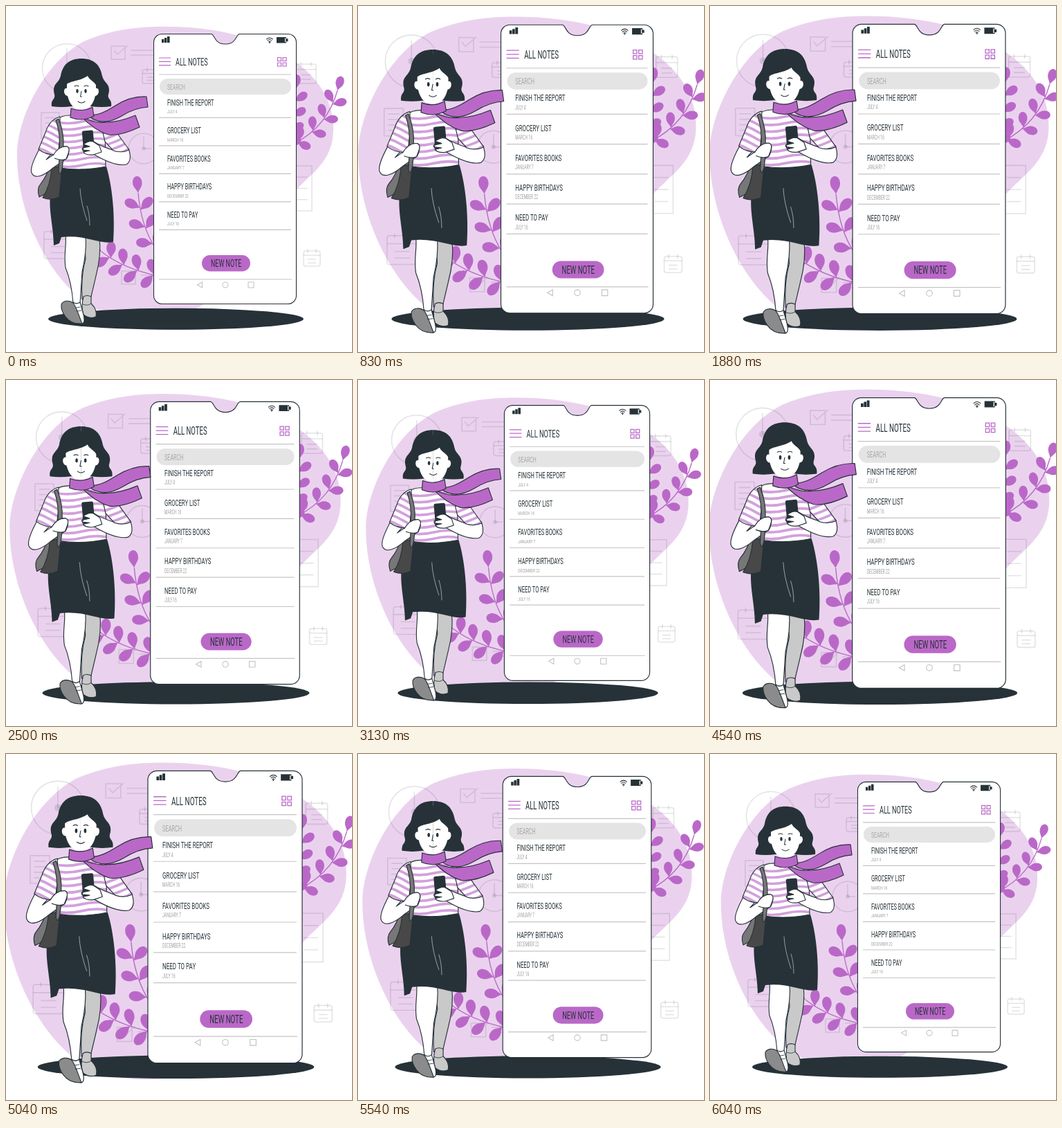
An HTML page for the animation above (6.08 s loop, 500 by 500 pixels).

```html
<!DOCTYPE html>
<html lang="en">
<head>
<meta charset="utf-8">
<title>All notes</title>
<style>
html, body { margin: 0; width: 100%; height: 100%; overflow: hidden; background: #fff }
svg { display: block; width: 100vw; height: 100vh }
text { font-family: Roboto, "Liberation Sans", sans-serif; fill: #263238 }
.dark { fill: #263238 }
.purple { fill: #ba68c8 }
.white { fill: #fff }
.grey { fill: #c9c9c9 }
.line { fill: none; stroke: #263238; stroke-linecap: round; stroke-linejoin: round }
.ink { stroke: #263238; stroke-width: 1.1; stroke-linejoin: round }
.stripes { fill: none; stroke: #d3a0dd; stroke-width: 3.6 }
.rule { stroke: #c4c4c4; stroke-width: 1.1; fill: none }
.accent { stroke: #ba68c8; stroke-width: 1.2; fill: none }
#icons { fill: none; stroke: #263238; stroke-opacity: .13; stroke-width: 1.5 }
#icons .dot { fill: #263238; fill-opacity: .13; stroke: none }
#plants .stem { fill: none; stroke: #ba68c8; stroke-width: 1.3 }
</style>
</head>
<body>
<svg viewBox="0 0 500 500">
  <defs>
    <path id="torso" d="M92 158Q80 158 74 164L78 234Q110 239 144 232L143 176Q138 162 126 158Z"/>
    <path id="sleeveL" d="M78 160Q63 164 57 183L47 207Q58 216 75 215L78 190Z"/>
    <path id="sleeveR" d="M136 166Q152 168 160 183L178 208Q167 213 155 209L143 196Z"/>
    <clipPath id="torsoClip"><use href="#torso"/></clipPath>
    <clipPath id="sleeveLClip"><use href="#sleeveL"/></clipPath>
    <clipPath id="sleeveRClip"><use href="#sleeveR"/></clipPath>
    <path id="halfHair" d="M109 76C92 76 82 84 79 101C77 110 69 112 69 121C69 128 72 129 69 134Q65 138 66 145Q80 147 95 145H109Z"/>
    <path id="halfFace" d="M109 100H96L88 108V119C83 117 82 129 89 130Q94 150 109 150Z"/>
  </defs>

  <path data-pivot="245 240" fill="#ead2ee" d="M215 30C300 28 370 45 420 82C455 108 473 140 473 178C473 235 425 248 400 290C370 340 345 400 290 428C250 457 190 459 140 442C72 414 16 310 16 215C16 162 56 79 115 50Q160 31 215 30Z"/>
  <g id="icons" data-pivot="246 240"></g>
  <ellipse data-pivot="245.5 452.3" class="dark" cx="245.5" cy="452.3" rx="184.5" ry="15.5"/>
  <g id="plants" class="purple" data-pivot="314 247"></g>

  <g id="phone" data-pivot="316.5 235.5">
    <path class="white ink" d="M225.5 40.5H297C302 42 301 55 317 55S332 42 337 40.5H407.5a12 12 0 0 1 12 12V418.5a12 12 0 0 1-12 12H225.5a12 12 0 0 1-12-12V52.5a12 12 0 0 1 12-12Z"/>
    <path class="dark" d="M225 48h3.4v5h-3.4zm4-2h3.4v7h-3.4zm4-2h3.6v9h-3.6zM391 45h14v2.3h2.5v4h-2.5v2.2h-14z"/>
    <path class="white" d="M403 46.3h1.2v6H403z"/>
    <path class="line" d="M376.5 48q4.5-4 9 0M378 50q3-2.8 6 0M379.6 51.8q1.4-1.3 2.8 0"/>
    <circle class="dark" cx="381" cy="53" r=".9"/>
    <rect x="222" y="105" width="190" height="23" rx="11.5" fill="#e4e4e4"/>
    <rect class="purple" x="283" y="360" width="70" height="23.5" rx="11.75"/>
    <path class="accent" d="M221 75h17m-17 5.3h17m-17 5.3h17"/>
    <path class="rule" d="M221 99H412M221 395H413M283.5 399v8l-7-4zM350 399h8v8h-8z"/>
    <circle class="rule" cx="317" cy="403" r="4"/>
  </g>

  <g data-pivot="122 268">
    <!-- legs and shoes -->
    <path class="grey ink" d="M113 334H135Q138 360 130 390L122 424H110Q108 390 115 365Z"/>
    <path class="grey ink" d="M112 420Q117 417 123 420V430Q132 438 130 449Q121 453 112 446Q108 435 112 420Z"/>
    <path class="white ink" d="M86 330H115Q117 355 110 384L107 430H97Q95 400 86 378C83 358 88 346 86 330Z"/>
    <path class="white ink" d="M97 428Q102 432 107 428L112 446Q115 459 109 459Q98 453 97 428Z"/>
    <path fill="#8b8b8b" class="ink" d="M80 431C83 425 92 425 97 429C102 435 105 447 110 459Q94 460 86 449Q79 440 80 431Z"/>
    <path class="line" stroke-width=".8" d="M111 431q7 3 12-1M101 436l6-1M102 441l7-1"/>

    <!-- sweater and skirt -->
    <g data-knit="torso"></g>
    <path class="dark" d="M77 234Q110 239 145 232C153 258 158 300 155 341C135 345 115 330 80 334L77 343L69 346C69 320 60 290 65 268Z"/>
    <path class="line" style="stroke:#aeb4b7" stroke-width=".8" d="M107 264Q108 284 117 310M117 289q4 12 4 28"/>

    <!-- bag and left arm -->
    <path fill="#777" class="ink" d="M66 225L80 222L60 270L48 276Q44 264 50 257Q58 248 66 225Z"/>
    <path fill="#484848" class="ink" d="M66 235Q74 230 81 234L77 276Q66 282 53 277Q64 260 66 235Z"/>
    <path class="white ink" d="M48 207Q34 233 37 241C41 250 53 247 68 234L88 220Q94 207 88 203Q78 202 74 211L58 222L67 212Z"/>
    <g data-knit="sleeveL" data-turn="17 64 190"></g>
    <path fill="#777" class="ink" d="M72 165l4-2q8 20 7 40l-6 4q2-22-5-42Z"/>
    <path fill="#777" class="ink" d="M77 220h6l-2 16q-3 12-5 2Z"/>
    <path class="white ink" d="M68 216Q76 202 88 203Q93 205 90 213L87 221Q80 224 70 220"/>

    <!-- right arm holding a phone -->
    <path class="white ink" d="M177 206Q183 223 174 229C160 232 140 222 128 215Q112 214 110 206Q118 194 127 196Q137 203 160 210Z"/>
    <g data-knit="sleeveR" data-turn="-32 158 190"></g>
    <rect class="dark" x="111" y="180" width="16" height="33" rx="2" transform="rotate(-5 119 196)"/>
    <path class="white ink" d="M112 200Q120 194 126 196L135 202L138 211L126 215Q115 216 112 211L121 209L111 208L112 205L121 203Z"/>

    <!-- scarf tails -->
    <g class="purple ink">
      <path d="M109 160Q128 170 145 168Q163 168 187 158L193 175Q166 188 148 186Q128 180 109 160Z"/>
      <path d="M117 157C132 160 147 151 158 144Q180 130 203 131L205 146Q186 147 167 159C150 169 132 171 117 157Z"/>
    </g>

    <!-- head -->
    <g class="dark" data-mirror="halfHair"></g>
    <g class="white" data-mirror="halfFace"></g>
    <path class="dark" d="M85 117C89 107 105 110 118 101C121 108 128 108 132 118L137 99L110 82L82 99Z"/>
    <path class="line" d="M99 116q3-2 6 0m8 0q3-2 6 0m-10 7l-1.5 8h2M104 138q5 4 10 0"/>
    <g class="dark"><ellipse cx="103" cy="123" rx="1.7" ry="2.9"/><ellipse cx="115" cy="123" rx="1.7" ry="2.9"/></g>
    <path class="purple ink" d="M94 148Q110 154 125 146L127 159Q111 168 93 161Z"/>
  </g>
</svg>

<script>
const $ = q => document.querySelector(q);
const $$ = q => [...document.querySelectorAll(q)];
const add = (g, markup) => g.insertAdjacentHTML('beforeend', markup);
const loop = (n, f) => Array.from({ length: n }, (_, i) => f(i)).join('');

// Background icons
const icon = (d, more = '') => add($('#icons'), `<path d="${d}"/>${more}`);
const box = (x, y, w, h) => `M${x} ${y}h${w}v${h}h${-w}z`;
const clock = (x, y, r) => icon(`M${x} ${y - r * .8}v${r * .8}h${r * .5}`,
  `<circle cx="${x}" cy="${y}" r="${r}"/><circle class="dot" cx="${x}" cy="${y}" r="${r * .13}"/>`);
const check = (x, y) => icon(box(x, y, 20, 19) + `m4 6l5 6l15-13m4 7h33m-33 7h33`);
const page = (x, y, w, h, n) => icon(box(x, y, w, h) +
  loop(n, i => `M${x + w * .2} ${y + h * (i + 1) / (n + 1)}h${w * .6}`));
const calendar = (x, y, w, h) => icon(
  `M${x} ${y + h * .28}h${w}M${x + w / 4} ${y - 3}v6m${w / 2} -6v6` +
  loop(2, i => `M${x + w / 4} ${y + h * (.55 + i * .23)}h${w / 2}`),
  `<rect x="${x}" y="${y}" width="${w}" height="${h}" rx="3"/>`);
clock(88, 90, 35.5);
clock(199, 206, 22);
check(152, 58);
check(167, 383);
page(51, 154, 26, 37, 4);
page(410, 231, 32, 65, 3);
calendar(197, 92, 28, 20);
calendar(419, 84, 29, 28);
calendar(55, 326, 41, 39);
calendar(430, 354, 24, 22);

// A curved stem with pairs of teardrop leaves and one leaf at its end
function branch([x0, y0], [cx, cy], [x1, y1], pairs, len, spread) {
  const at = (a, c, b, t) => a * (1 - t) ** 2 + 2 * c * t * (1 - t) + b * t * t;
  const slope = (a, c, b, t) => (c - a) * (1 - t) + (b - c) * t;
  const leaf = (t, side) => {
    const turn = Math.atan2(slope(y0, cy, y1, t), slope(x0, cx, x1, t)) * 180 / Math.PI + side * spread;
    return `<path transform="translate(${at(x0, cx, x1, t)} ${at(y0, cy, y1, t)}) rotate(${turn}) scale(${len})"
      d="M0 0C.3 -.14 .35 -.29 .65 -.28C.85 -.27 1 -.15 1 0S.85 .27 .65 .28C.35 .29 .3 .14 0 0Z"/>`;
  };
  add($('#plants'), `<path class="stem" d="M${x0} ${y0}Q${cx} ${cy} ${x1} ${y1}"/>` + leaf(1, 0) +
    loop(pairs, i => leaf((i + .3) / pairs, -1) + leaf((i + .2) / pairs, 1)));
}
branch([216, 350], [195, 318], [191, 270], 3, 24, 55);
branch([220, 390], [170, 380], [138, 355], 4, 24, 60);
branch([416, 199], [464, 175], [479, 122], 4, 21, 52);
branch([406, 205], [416, 165], [419, 120], 4, 21, 50);

// Striped knitwear and mirrored halves of the head
for (const g of $$('[data-knit]')) {
  const { knit, turn = '0' } = g.dataset;
  const rows = loop(8, i => `M30 ${167 + i * 9}q20 -5 40 0t40 0t40 0t40 0`);
  add(g, `<use href="#${knit}" class="white"/>
    <g clip-path="url(#${knit}Clip)"><path class="stripes" d="${rows}" transform="rotate(${turn})"/></g>
    <use href="#${knit}" fill="none" class="ink"/>`);
}
for (const g of $$('[data-mirror]')) {
  const half = `<use href="#${g.dataset.mirror}"`;
  add(g, `${half}/>${half} transform="translate(218 0) scale(-1 1)"/>`);
}

// Phone screen; all lettering shares one condensed ratio
const phone = $('#phone');
const label = (x, y, size, str, fill = '#263238') =>
  add(phone, `<text transform="translate(${x} ${y}) scale(.6 1)" font-size="${size}" style="fill:${fill}">${str}</text>`);
add(phone, `<path class="accent" d="${loop(4, i => box(392.5 + i % 2 * 7.5, 74.5 + (i >> 1) * 7.5, 5, 5))}"/>`);
label(245, 86, 15.2, 'ALL NOTES');
label(233, 121, 11.4, 'SEARCH', '#a8a8a8');
label(296, 377, 14.9, 'NEW NOTE');
['FINISH THE REPORT/JULY 4', 'GROCERY LIST/MARCH 16', 'FAVORITES BOOKS/JANUARY 7',
 'HAPPY BIRTHDAYS/DECEMBER 22', 'NEED TO PAY/JULY 16'].forEach((note, i) => {
  const [name, date] = note.split('/'), y = 143.6 + i * 40.5;
  label(233, y, 12.3, name);
  label(233, y + 11.6, 7.9, date, '#a0a0a0');
  add(phone, `<path class="rule" d="M221 ${y + 17.8}H412"/>`);
});

// Two pulses per loop; the first one sinks slowly
const LOOP = 6080;
const bump = (t, peak, rise, fall) => Math.max(0, 1 - (t < peak ? (peak - t) / rise : (t - peak) / fall));
const scaleAt = t => 1 + .1 * Math.max(bump(t, 1225, 1225, 2385), bump(t, 4830, 1220, 1220));

const parts = $$('[data-pivot]');
const start = performance.now();
function draw() {
  const s = scaleAt((performance.now() - start) % LOOP);
  for (const p of parts) {
    const [x, y] = p.dataset.pivot.split(' ');
    p.setAttribute('transform', `translate(${x} ${y}) scale(${s}) translate(${-x} ${-y})`);
  }
  requestAnimationFrame(draw);
}
draw();
</script>
</body>
</html>
```
